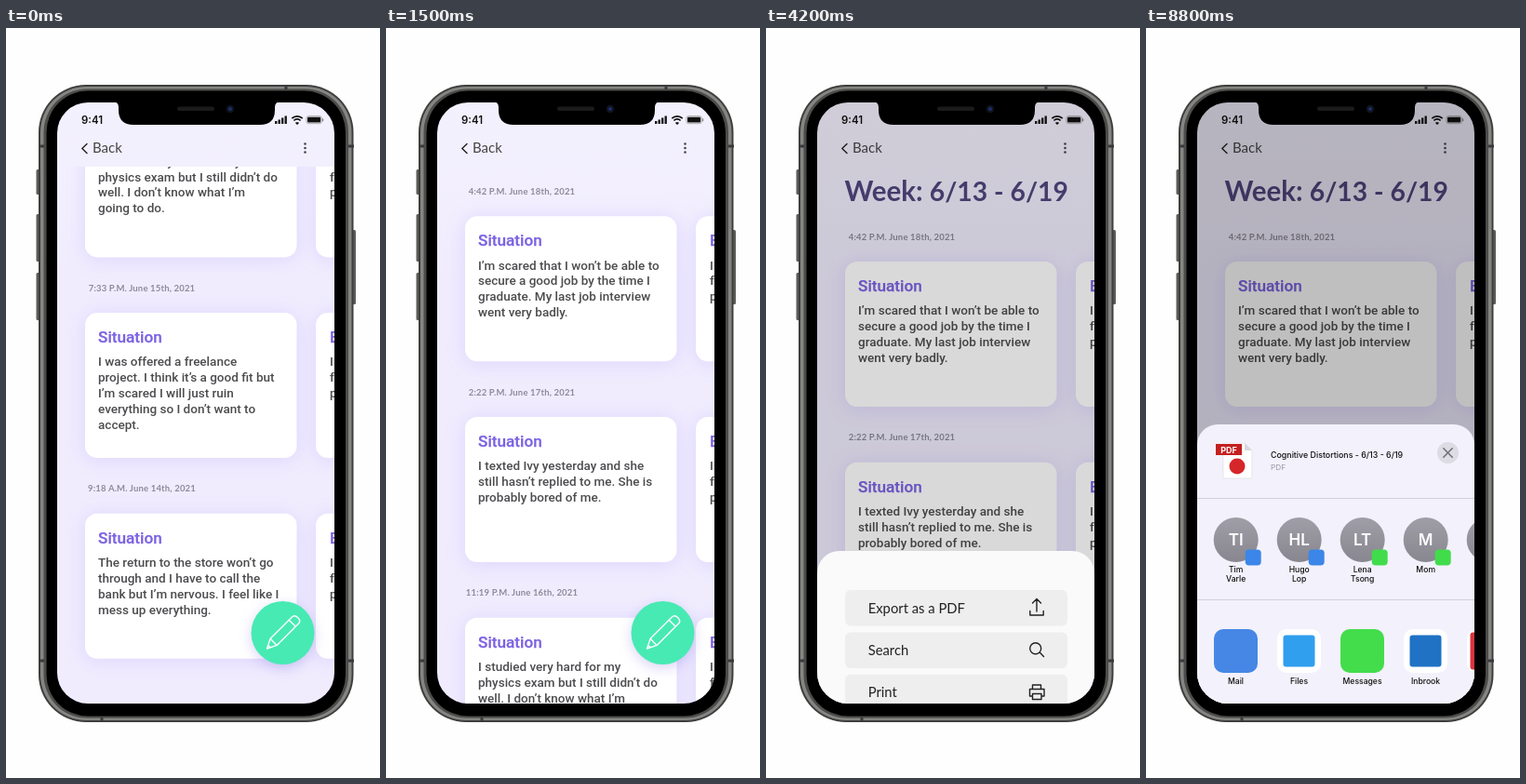
An HTML page for the animation above (8900 ms loop, 402x806 px).

```html
<!DOCTYPE html>
<html lang="en">
<head>
<meta charset="utf-8">
<title>Journal week</title>
<style>
html, body { margin: 0; width: 100%; height: 100%; overflow: hidden; background: #fefefe; }
svg { display: block; width: 402px; height: 806px; }
text { white-space: pre; }
.lato { font-family: Lato, sans-serif; }
.inter { font-family: Inter, sans-serif; }
.mid { text-anchor: middle; }
.week { font-size: 29.5px; font-weight: 700; fill: #51477f; }
.week tspan { font-size: 28.3px; }
.date { font: 700 9.5px Lato, sans-serif; letter-spacing: .17px; fill: #8e8a99; }
.head { font: 500 17.2px Roboto, sans-serif; fill: #7b62e2; stroke: #7b62e2; stroke-width: .25; }
.body { font: 500 13.5px Roboto, sans-serif; fill: #4c4c4f; }
.card { fill: #fff; filter: drop-shadow(0 2px 10px rgba(130, 100, 250, .17)); }
.item { font-size: 14.8px; fill: #222; }
.small { font-size: 8.6px; font-weight: 500; fill: #111; }
.line { fill: none; stroke: #222; stroke-width: 1.4; stroke-linecap: round; stroke-linejoin: round; }

#list, #dim, #menu, #flash, #share { animation: 8.9s linear infinite; }
#list { animation-name: scroll; }
#dim { animation-name: dim; }
#menu { animation-name: menu; }
#flash { animation-name: flash; }
#share { animation-name: share; }

@keyframes scroll {
  0%, 2.247% { transform: translateY(-592px); animation-timing-function: cubic-bezier(.4, 0, .75, .65); }
  11.236% { transform: translateY(-282px); animation-timing-function: cubic-bezier(.25, .475, .4, 1); }
  22.472% { transform: translateY(2px); animation-timing-function: ease-in-out; }
  28.09%, 100% { transform: translateY(0); }
}
@keyframes dim {
  0%, 44.944% { opacity: 0; }
  47.191% { opacity: .15; animation-timing-function: ease-out; }
  49.438%, 100% { opacity: .25; }
}
@keyframes menu {
  0%, 44.944% { transform: translateY(263px); }
  47.191% { transform: translateY(97px); animation-timing-function: ease-out; }
  49.438%, 100% { transform: translateY(0); }
}
@keyframes flash {
  0%, 65.169% { opacity: 0; }
  66.292%, 69.663% { opacity: 1; }
  73.034%, 100% { opacity: 0; }
}
@keyframes share {
  0%, 71.91% { transform: translateY(302px); animation-timing-function: ease-out; }
  76.404%, 100% { transform: translateY(0); }
}
</style>
</head>
<body>
<svg viewBox="0 0 402 806">
  <defs>
    <clipPath id="screen"><rect x="55" y="80" width="298" height="646" rx="33"/></clipPath>
    <clipPath id="scroller"><rect x="55" y="149" width="298" height="577"/></clipPath>
    <linearGradient id="paper" x2="0" y2="1">
      <stop offset="0" stop-color="#f4f1fe"/><stop offset=".3" stop-color="#f0ecfe"/>
      <stop offset="1" stop-color="#f0ecfe"/>
    </linearGradient>
    <linearGradient id="grey" x2="0" y2="1">
      <stop offset="0" stop-color="#a09fa7"/><stop offset="1" stop-color="#88878f"/>
    </linearGradient>
  </defs>

  <!-- phone body -->
  <g fill="#5c5c5a">
    <rect x="32.500" y="152" width="4" height="27" rx="1.500"/>
    <rect x="32.500" y="200" width="4" height="51" rx="1.500"/>
    <rect x="32.500" y="263" width="4" height="51" rx="1.500"/>
    <rect x="372" y="217" width="4" height="80" rx="1.500"/>
  </g>
  <rect x="35" y="61" width="338.500" height="685" rx="51" fill="#3e3e3d"/>
  <rect x="37" y="63" width="334.500" height="681" rx="49" fill="#858583"/>
  <rect x="40.500" y="65.500" width="327.500" height="676" rx="46.500" fill="#4c4c4b"/>
  <rect x="43.500" y="67.500" width="321.500" height="672" rx="44.500" fill="#000"/>
  <path d="M35 127h6M368 127h6M35 680h6M368 680h6M301 61v5M103 741v5" stroke="#3a3a3a" stroke-width="3"/>

  <g clip-path="url(#screen)">
    <rect x="55" y="80" width="298" height="646" fill="url(#paper)"/>
    <g clip-path="url(#scroller)"><g id="list">
      <text class="lato week" x="84.500" y="185.500">Week: <tspan>6/13 - 6/19</tspan></text>
    </g></g>

    <path d="M87 124.500l-5.200 5 5.200 5" class="line" stroke-width="1.700"/>
    <text class="lato" x="93" y="134.200" font-size="15" fill="#444">Back</text>
    <g fill="#444"><circle cx="321.500" cy="124.500" r="1.300"/><circle cx="321.500" cy="129" r="1.300"/><circle cx="321.500" cy="133.500" r="1.300"/></g>

    <text class="inter" x="81" y="103" font-size="11.400" font-weight="600" fill="#111">9:41</text>
    <path d="M290.200 103v-3M293.700 103v-4.500M297.200 103v-6.500M300.700 103v-8.500" stroke="#111" stroke-width="2.300"/>
    <g fill="none" stroke="#111" stroke-width="1.700">
      <path d="M307.300 97.200a8 8 0 0 1 11.400 0M309.400 99.500a5 5 0 0 1 7.200 0"/>
      <path d="M312 102l1 1 1-1z" stroke-linejoin="round"/>
    </g>
    <rect x="322.900" y="94.700" width="16.400" height="8" rx="2.300" fill="none" stroke="#999" stroke-width=".8"/>
    <rect x="324" y="95.800" width="14.200" height="5.800" rx="1.300" fill="#111"/>
    <path d="M340.700 97.300v3" stroke="#777"/>

    <g style="filter: drop-shadow(0 4px 7px rgba(120, 100, 220, .28))"><circle cx="297.500" cy="650" r="34" fill="#47eab3"/></g>
    <g transform="translate(297.500 650) rotate(45)" fill="none" stroke="#fff" stroke-width="1.400" stroke-linejoin="round">
      <path d="M-5-19q0-4 5-4t5 4v33l-5 10-5-10zM-5-14.500h10M-5 14h10M-1.700 20.500h3.400"/>
    </g>

    <rect id="dim" x="55" y="80" width="298" height="646" opacity="0"/>

    <g id="menu">
      <rect x="55" y="465" width="298" height="300" rx="24" fill="#fafafa"/>
    </g>

    <g id="share">
      <rect x="55" y="426" width="298" height="340" rx="22" fill="#f3f1fb"/>
      <path d="M83 446h23l8 8v30h-31z" fill="#fff" stroke="#dedde2" stroke-width=".7"/>
      <path d="M106 446v8h8z" fill="#d9d8de"/>
      <circle cx="98" cy="471" r="8.500" fill="#d5262a"/>
      <rect x="75" y="447" width="28" height="12" fill="#c4201f"/>
      <text class="inter mid" x="89" y="456.500" font-size="9" font-weight="700" fill="#fff">PDF</text>
      <text class="inter" x="134" y="462" font-size="8.850" font-weight="500" fill="#111">Cognitive Distortions - 6/13 - 6/19</text>
      <text class="inter" x="134" y="475" font-size="8.200" fill="#98979e">PDF</text>
      <circle cx="324.500" cy="456.500" r="11.500" fill="#dddbe3"/>
      <path d="M319.800 451.800l9.400 9.400M329.200 451.800l-9.400 9.400" stroke="#6f6e75" stroke-width="1.500" stroke-linecap="round"/>
      <path d="M55 505.500h298M55 614.500h298" stroke="#d3d0da"/>
    </g>
  </g>

  <path d="M114 79q7 0 7 6v3q0 16 16 16h136q16 0 16-16v-3q0-6 7-6z"/>
  <rect x="184" y="84.500" width="40" height="4.500" rx="2.200" fill="#1b1b1c"/>
  <circle cx="241" cy="87" r="4.300" fill="#10131f"/>
  <circle cx="241" cy="87" r="2" fill="#1c2f6b"/>
</svg>

<script>
const add = (id, html) => document.getElementById(id).insertAdjacentHTML('beforeend', html);
const text = (cls, x, y, s, extra = '') => `<text class="${cls}" x="${x}" y="${y}" ${extra}>${s}</text>`;
const box = (x, y, w, h, r, fill) => `<rect x="${x}" y="${y}" width="${w}" height="${h}" rx="${r}" fill="${fill}"/>`;

// journal entries
const entries = [
  ['4:42 P.M. June 18th, 2021', 'I’m scared that I won’t be able to|secure a good job by the time I|graduate. My last job interview|went very badly.'],
  ['2:22 P.M. June 17th, 2021', 'I texted Ivy yesterday and she|still hasn’t replied to me. She is|probably bored of me.'],
  ['11:19 P.M. June 16th, 2021', 'I studied very hard for my|physics exam but I still didn’t do|well. I don’t know what I’m|going to do.'],
  ['7:33 P.M. June 15th, 2021', 'I was offered a freelance|project. I think it’s a good fit but|I’m scared I will just ruin|everything so I don’t want to|accept.'],
  ['9:18 A.M. June 14th, 2021', 'The return to the store won’t go|through and I have to call the|bank but I’m nervous. I feel like I|mess up everything.']
];
const card = (x, y, head, body, pad) =>
  `<rect class="card" x="${x}" y="${y}" width="227.500" height="156" rx="13"/>` +
  text('head', x + pad, y + 32, head) +
  body.split('|').map((s, i) => text('body', x + pad, y + 57.3 + i * 16.8, s)).join('');

entries.forEach(([date, body], i) => {
  const y = 251 + i * 215.7;
  add('list', text('date mid', 146, y - 23.5, date) +
    card(85, y, 'Situation', body, 14) + card(333, y, 'Emotion', 'I|f|p', 15));
});

// action menu
const icons = [
  'M291 530v-13.500M286.500 521l4.500-4.500 4.500 4.500M283.800 529.500v4.500h14.400v-4.500',
  'M295.700 569.700a6 6 0 1 0-12 0a6 6 0 1 0 12 0M294.200 574l4.300 4.500',
  'M286.500 613.500v-4.500h9v4.500M286.500 621h-3v-7.500h15.500v7.500h-3M286.500 618.500h9.500v6h-9.500z',
  'M284.500 657h13.500M288.500 657v-2.500h5.500v2.500M286 657v13h10.500v-13M289.500 660.500v6.500M293 660.500v6.500'
];
['Export as a PDF', 'Search', 'Print', 'Delete'].forEach((name, i) => {
  const y = 507 + i * 45.4;
  add('menu', box(85, y, 239, 38.5, 6, '#eee') +
    text('lato item', 109.7, y + 24.7, name, i === 3 ? 'style="fill:#d0103a"' : '') +
    `<path class="line" d="${icons[i]}"/>`);
});
add('menu', '<rect id="flash" x="86" y="508" width="237" height="37" fill="#5ad2f5" fill-opacity=".4" stroke="#6cdbf4" stroke-width="2"/>');

// share sheet
const blue = '#3b86e8', green = '#41dc4c';
const people = [['TI', 'Tim|Varle', blue], ['HL', 'Hugo|Lop', blue], ['LT', 'Lena|Tsong', green], ['M', 'Mom', green], ['', '', blue]];
const apps = [['Mail', '#4687e6'], ['Files', '#2f9fee', 34], ['Messages', '#43dd4b'], ['Inbrook', '#1f72c4', 34], ['', '#d8343c', 40]];
people.forEach(([initials, name, badge], i) => {
  const x = 96.7 + i * 68;
  add('share', `<circle cx="${x}" cy="550" r="24" fill="url(#grey)"/>` +
    text('inter mid', x, 556.2, initials, 'font-size="17" font-weight="600" fill="#fff"') +
    box(x + 10, 560.5, 17, 17, 4, badge) +
    name.split('|').map((s, k) => text('inter small mid', x, 585 + k * 10, s)).join(''));
});
apps.forEach(([name, color, inner], i) => {
  const x = 96.5 + i * 68;
  add('share', (inner
    ? box(x - 23.5, 646, 47, 47, 10, '#fff') + box(x - inner / 2, 669.5 - inner / 2, inner, inner, 3, color)
    : box(x - 23.5, 646, 47, 47, 10, color)) +
    text('inter small mid', x, 705, name));
});

// ten pictures per second
const loop = 8900, step = 100;
const moves = document.getAnimations();
moves.forEach(m => m.pause());
function tick() {
  const t = Math.floor(performance.now() % loop / step) * step;
  moves.forEach(m => { m.currentTime = t; });
  requestAnimationFrame(tick);
}
tick();
</script>
</body>
</html>
```
